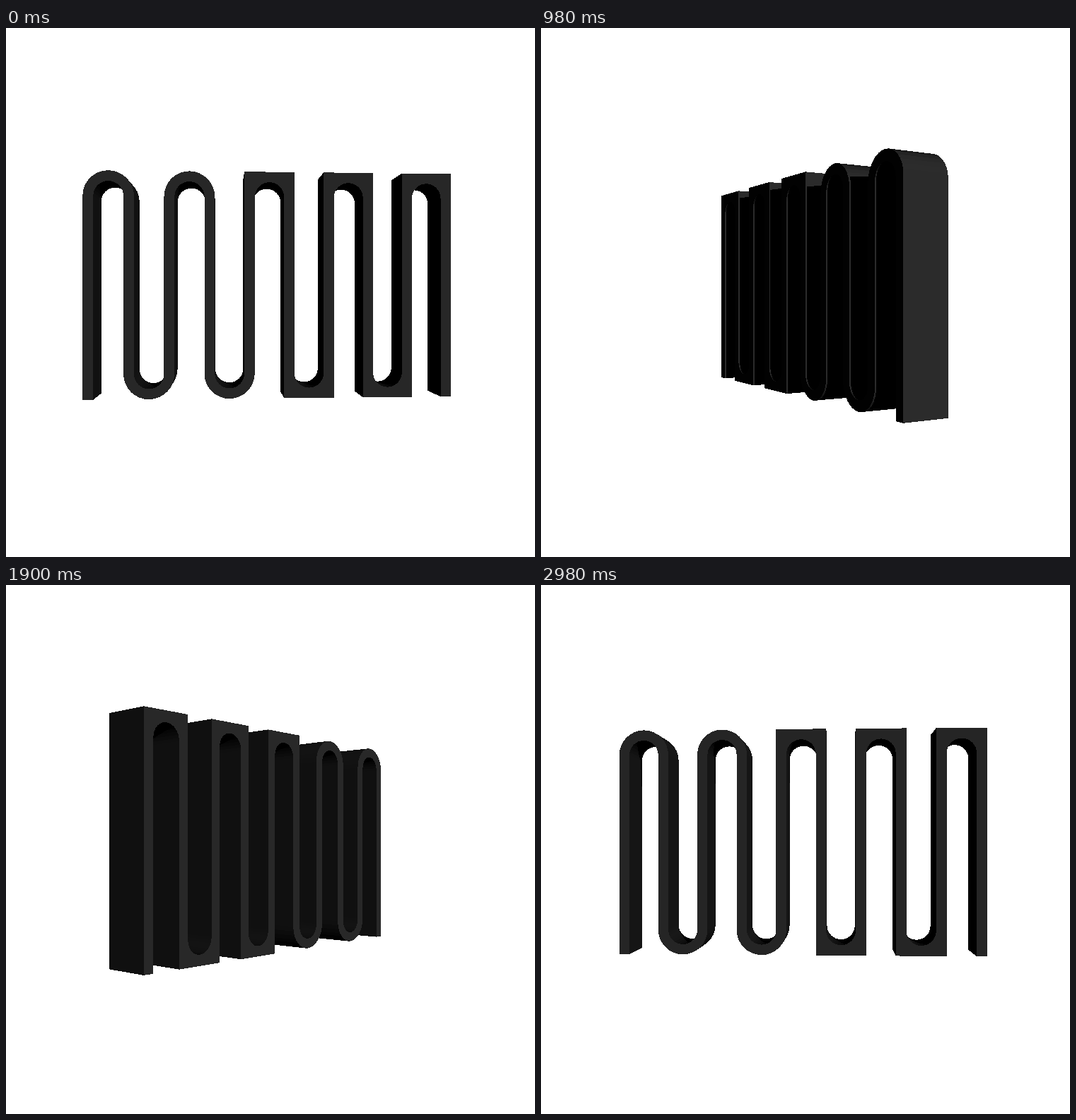
Recreate the animation shown at these times as an HTML page with a canvas. Size 748 by 748 pixels, loop 3 s.

```html
<!DOCTYPE html>
<html lang="en">
<head>
<meta charset="utf-8">
<title>Turning coil</title>
<style>
  html, body { margin: 0; width: 100%; height: 100%; overflow: hidden; background: #fff; }
  canvas { display: block; width: 748px; height: 748px; }
</style>
</head>
<body>
<canvas id="stage" width="748" height="748"></canvas>
<script>
const SIZE = 748, MID = SIZE / 2;
const FRAME = 20, FRAMES = 150;
const START = 3.6, STEP = 2.3735;        // degrees, degrees per frame
const DIST = 1035, EYE_Y = -10;          // camera
const FRONT = 42, BACK = -22;            // extrusion depth
const HALF = 153.5, PITCH = 54, LEFT = -247;
const INNER = 20, OUTER = 34, ARC = 16, CUTS = 6;
const LIGHT_AZ = 27, LIGHT_EL = 14, LIGHT_GREY = 44;

const rad = deg => deg * Math.PI / 180;
const mix = (a, b, k) => [a[0] + (b[0] - a[0]) * k, a[1] + (b[1] - a[1]) * k];
const clamp = (v, lo, hi) => Math.min(hi, Math.max(lo, v));

// The snake as pairs of points: left and right of the direction of travel.
function buildRibs() {
  const ribs = [];
  const legTo = rib => {
    const from = ribs[ribs.length - 1];
    for (let k = 1; k <= CUTS; k++) {
      ribs.push([mix(from[0], rib[0], k / CUTS), mix(from[1], rib[1], k / CUTS)]);
    }
  };
  const half = (OUTER - INNER) / 2;
  ribs.push([[LEFT - half, -HALF], [LEFT + half, -HALF]]);
  for (let i = 0; i < 9; i++) {
    const up = i % 2 === 0, dir = up ? 1 : -1;
    const cx = LEFT + PITCH * (i + 0.5), cy = dir * (HALF - OUTER);
    for (let k = 0; k <= ARC; k++) {
      const a = Math.PI * (1 - k / ARC);
      const dx = Math.cos(a), dy = dir * Math.sin(a);
      const m = i < 4 ? 1 : Math.max(Math.abs(dx), Math.abs(dy));
      const out = [cx + OUTER * dx / m, cy + OUTER * dy / m];
      const inn = [cx + INNER * dx, cy + INNER * dy];
      const rib = up ? [out, inn] : [inn, out];
      if (k === 0) legTo(rib); else ribs.push(rib);
    }
  }
  const end = LEFT + 9 * PITCH;
  legTo([[end + half, -HALF], [end - half, -HALF]]);
  return ribs;
}

const ribs = buildRibs();
const outline = [...ribs.map(r => r[0]), ...ribs.map(r => r[1]).reverse()];
const walls = outline.map((p, i) => {
  const q = outline[(i + 1) % outline.length];
  const ex = q[0] - p[0], ey = q[1] - p[1], len = Math.hypot(ex, ey);
  return { p, q, ex, ey, nx: -ey / len, ny: ex / len };
});

const ctx = document.getElementById('stage').getContext('2d');
const image = ctx.createImageData(SIZE, SIZE);
const pixels = new Uint32Array(image.data.buffer);
const depth = new Float32Array(SIZE * SIZE);
const grey = dot => (0xff000000 | Math.round(LIGHT_GREY * Math.max(0, dot)) * 0x010101) >>> 0;
const BLACK = grey(0);

function fillTriangle(a, b, c, color) {
  const bx = b[0] - a[0], by = b[1] - a[1], cx = c[0] - a[0], cy = c[1] - a[1];
  const area = bx * cy - cx * by;
  if (Math.abs(area) < 0.05) return;
  const bw = b[2] - a[2], cw = c[2] - a[2];
  const gx = (bw * cy - cw * by) / area, gy = (cw * bx - bw * cx) / area;
  const edges = [[a, b], [b, c], [c, a]];
  const y0 = Math.max(0, Math.ceil(Math.min(a[1], b[1], c[1]) - 0.5));
  const y1 = Math.min(SIZE - 1, Math.floor(Math.max(a[1], b[1], c[1]) - 0.5));
  for (let y = y0; y <= y1; y++) {
    const py = y + 0.5;
    let lo = Infinity, hi = -Infinity;
    for (const [s, e] of edges) {
      if ((s[1] <= py) === (e[1] <= py)) continue;
      const x = s[0] + (e[0] - s[0]) * (py - s[1]) / (e[1] - s[1]);
      lo = Math.min(lo, x);
      hi = Math.max(hi, x);
    }
    const x0 = Math.max(0, Math.ceil(lo - 0.5001));
    const x1 = Math.min(SIZE - 1, Math.floor(hi - 0.4999));
    let w = a[2] + gx * (x0 + 0.5 - a[0]) + gy * (py - a[1]);
    for (let x = x0, i = y * SIZE + x0; x <= x1; x++, i++, w += gx) {
      if (w > depth[i]) {
        depth[i] = w;
        pixels[i] = color;
      }
    }
  }
}

function render(degrees) {
  const c = Math.cos(rad(degrees)), s = Math.sin(rad(degrees));
  pixels.fill(0xffffffff);
  depth.fill(0);

  // Eye and light in the turning object's own space.
  const eye = [-DIST * s, EYE_Y, DIST * c];
  const flat = Math.cos(rad(LIGHT_EL));
  const wx = Math.sin(rad(LIGHT_AZ)) * flat, wz = Math.cos(rad(LIGHT_AZ)) * flat;
  const lx = wx * c - wz * s, ly = Math.sin(rad(LIGHT_EL)), lz = wx * s + wz * c;

  const project = (p, z) => {
    const w = 1 / (DIST + p[0] * s - z * c);
    const k = DIST * w;
    return [MID + (p[0] * c + z * s) * k, MID - (p[1] - EYE_Y) * k, w];
  };
  const fillQuad = (a, b, d, e, color) => {
    fillTriangle(a, b, d, color);
    fillTriangle(a, d, e, color);
  };
  const wallQuad = (p, pz0, pz1, q, qz0, qz1, color) =>
    fillQuad(project(p, pz0), project(q, qz0), project(q, qz1), project(p, pz1), color);

  // Distance along the light ray to the next wall.
  const reach = (x, y) => {
    let best = 1e6;
    for (const { p, ex, ey } of walls) {
      const det = lx * ey - ly * ex;
      if (det === 0) continue;
      const dx = p[0] - x, dy = p[1] - y;
      const t = (dx * ey - dy * ex) / det;
      if (t <= 0 || t >= best) continue;
      const u = (dx * ly - dy * lx) / det;
      if (u >= 0 && u <= 1) best = t;
    }
    return best;
  };

  const open = lz > 0 ? FRONT : BACK, shut = lz > 0 ? BACK : FRONT;
  const shadeEdge = (wall, k) => {
    const [x, y] = mix(wall.p, wall.q, k);
    return clamp(open - lz * reach(x + wall.nx * 0.01, y + wall.ny * 0.01), BACK, FRONT);
  };

  for (const wall of walls) {
    const { p, q, nx, ny } = wall;
    if (nx * (eye[0] - p[0]) + ny * (eye[1] - p[1]) <= 0) continue;
    const dot = nx * lx + ny * ly;
    if (dot <= 0) {
      wallQuad(p, FRONT, BACK, q, FRONT, BACK, BLACK);
      continue;
    }
    const zp = shadeEdge(wall, 0.02), zq = shadeEdge(wall, 0.98);
    wallQuad(p, open, zp, q, open, zq, grey(dot));
    wallQuad(p, zp, shut, q, zq, shut, BLACK);
  }

  const cap = (z, color) => {
    for (let i = 1; i < ribs.length; i++) {
      const [a, b] = ribs[i - 1], [d, e] = ribs[i];
      fillQuad(project(a, z), project(b, z), project(e, z), project(d, z), color);
    }
  };
  if (eye[2] > FRONT) cap(FRONT, grey(lz));
  if (eye[2] < BACK) cap(BACK, grey(-lz));

  ctx.putImageData(image, 0, 0);
}

const begin = performance.now();
let shown = -1;
function tick() {
  const n = Math.floor(Math.max(0, performance.now() - begin) / FRAME) % FRAMES;
  if (n !== shown) {
    shown = n;
    render(START + STEP * n);
  }
  requestAnimationFrame(tick);
}
tick();
</script>
</body>
</html>
```
